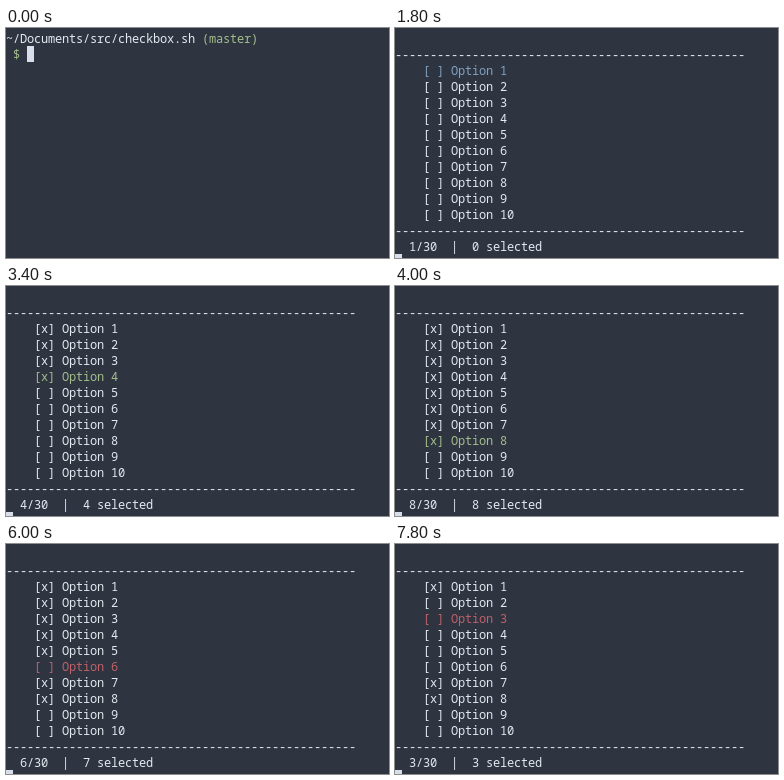
An HTML page with a canvas that plays this animation: 383 by 230 pixels, repeating every 8 s.

```html
<!DOCTYPE html>
<html lang="en">
<head>
<meta charset="utf-8">
<title>Terminal checkbox list</title>
<style>
  html, body { margin: 0; width: 383px; height: 230px; overflow: hidden; background: #2e3440; }
  canvas { display: block; }
</style>
</head>
<body>
<canvas id="screen" width="383" height="230"></canvas>
<script>
const ctx = document.getElementById('screen').getContext('2d');
const LOOP = 8000, TICK = 100, CELL_W = 7, CELL_H = 16;
const BG = '#2e3440', WHITE = '#e5e9f0', CURSOR = '#d8dee9';
const GREEN = '#a3be8c', BLUE = '#81a1c1', RED = '#bf616a';

const LIST_START = 1800, KEYS_START = 2900;
// Keys pressed in the list, one comma per tick:
// j down, k up, v toggles select mode, V toggles unselect mode
const keys = 'v,j,,j,,j,,j,j,,j,j,,,,,,,,,,v,,kk,,,,,,,,V,,,k,,k,k,,k,,,V,,,j,,,,V'.split(',');

// Write text on the terminal's character grid
function print(text, col, line, color = WHITE) {
  ctx.fillStyle = color;
  [...text].forEach((ch, i) => ctx.fillText(ch, (col + i) * CELL_W, 15 + line * CELL_H));
}

function cursor(col, line) {
  ctx.fillStyle = CURSOR;
  ctx.fillRect(col * CELL_W, 2 + line * CELL_H, CELL_W, CELL_H);
}

function drawPrompt(t) {
  // Commands recalled from the shell history
  const command = t < 400 ? '' : t < 1200 ? 'clear' : './checkbox.sh --multiple';
  print('~/Documents/src/checkbox.sh', 0, 0);
  print('(master)', 28, 0, GREEN);
  print('$', 1, 1, GREEN);
  print(command, 3, 1);
  cursor(3 + command.length, 1);
}

// Replay the keys pressed up to time t
function replay(t) {
  const checked = new Set();
  let active = 1, mode = '';
  const ticks = Math.max(0, Math.floor((t - KEYS_START) / TICK) + 1);
  for (const key of keys.slice(0, ticks).join('')) {
    if (key === 'j') active++;
    else if (key === 'k') active--;
    else mode = mode === key ? '' : key;
    if (mode === 'v') checked.add(active);
    if (mode === 'V') checked.delete(active);
  }
  return { checked, active, mode };
}

function drawList(t) {
  const { checked, active, mode } = replay(t);
  const activeColor = mode === 'v' ? GREEN : mode === 'V' ? RED : BLUE;
  const rule = '-'.repeat(50);
  print(rule, 0, 1);
  for (let row = 1; row <= 10; row++) {
    const mark = checked.has(row) ? 'x' : ' ';
    print(`[${mark}] Option ${row}`, 4, row + 1, row === active ? activeColor : WHITE);
  }
  print(rule, 0, 12);
  print(`${active}/30  |  ${checked.size} selected`, 2, 13);
  cursor(0, 14);
}

function draw() {
  const t = performance.now() % LOOP;
  ctx.fillStyle = BG;
  ctx.fillRect(0, 0, 383, 230);
  ctx.font = '12px "Noto Sans Mono", "DejaVu Sans Mono", monospace';
  (t < LIST_START ? drawPrompt : drawList)(t);
  requestAnimationFrame(draw);
}
draw();
</script>
</body>
</html>
```
